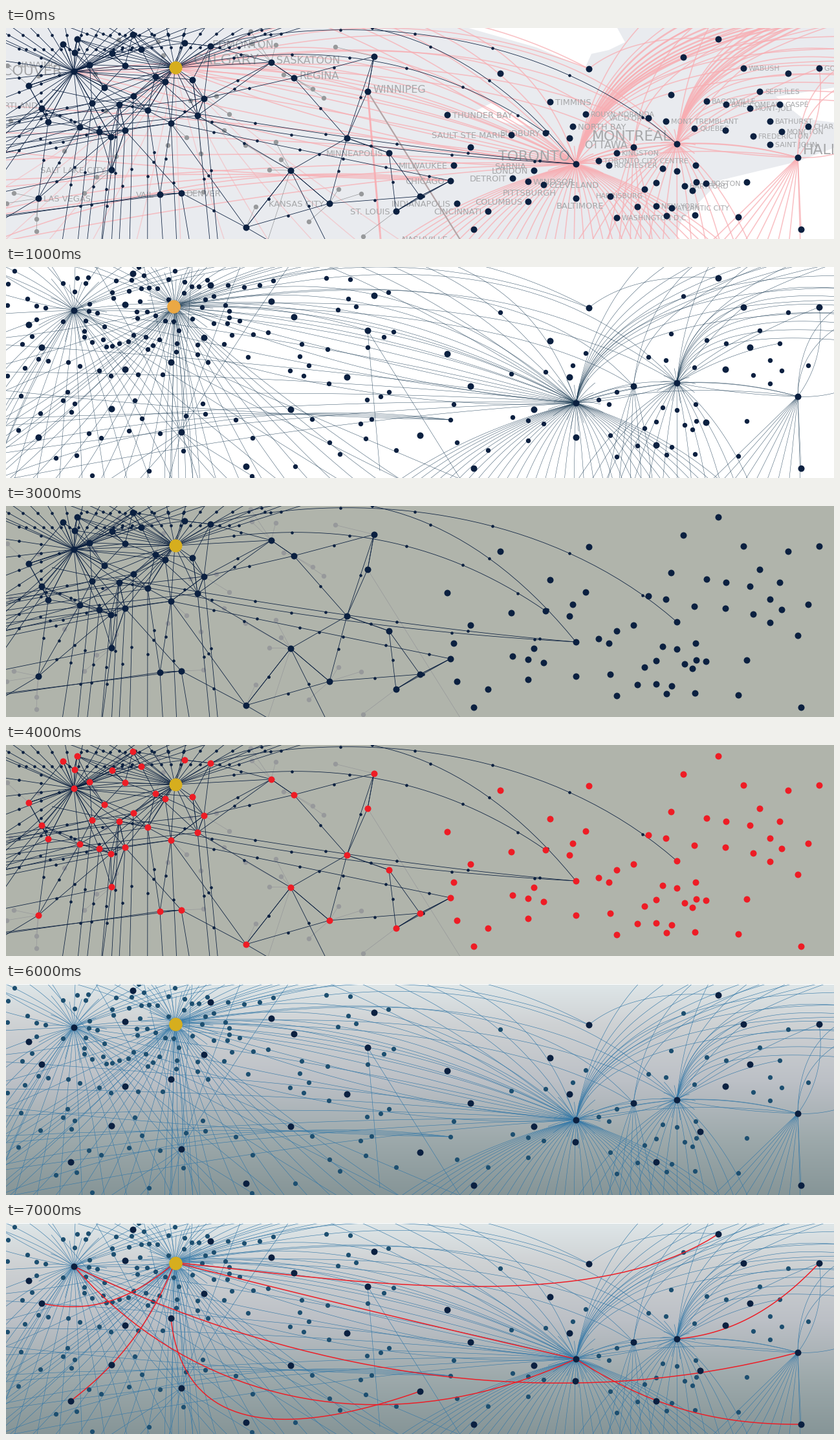
A matplotlib script for the animation above (9000 ms loop, 1280 by 326 pixels).

```python
import numpy as np
import matplotlib.pyplot as plt
from matplotlib.animation import FuncAnimation
from matplotlib.collections import LineCollection

W, H, DPI = 1280, 326, 100
PT = 72 / DPI
NAVY, RED, GOLD, ORANGE = "#0b2040", "#ee1c25", "#d6ae1e", "#eba844"
BLUE, STEEL, INK = "#3579a8", "#1d4f70", "#1c3c55"
GREY, PINK, LAND, STONE = "#97999b", "#f8adb2", "#e9ebef", "#b0b4ab"

# ---------- places ----------
# cities whose name stands left of the dot, then right of it
LEFT = {
    "TORONTO": (881, 210), "MONTRÉAL": (1037, 179), "OTTAWA": (970, 184),
    "SAULT STE MARIE": (781, 165), "SUDBURY": (834, 162), "LONDON": (816, 220),
    "DETROIT": (783, 232), "COLUMBUS": (807, 268), "CINCINNATI": (745, 283),
    "INDIANAPOLIS": (697, 271), "CHICAGO": (687, 236), "MILWAUKEE": (692, 212),
    "MINNEAPOLIS": (592, 193), "KANSAS CITY": (500, 271), "ST. LOUIS": (603, 283),
    "SALT LAKE CITY": (163, 219), "VAIL": (238, 257), "VAL-D'OR": (993, 139)}
RIGHT = {
    "WINNIPEG": (559, 98), "REGINA": (445, 77), "SASKATOON": (410, 53),
    "DENVER": (271, 255), "LAS VEGAS": (50, 263), "THUNDER BAY": (682, 134),
    "TIMMINS": (841, 114), "ROUYN-NORANDA": (896, 133), "NORTH BAY": (876, 152),
    "MONT TREMBLANT": (1020, 144), "KINGSTON": (944, 193),
    "TORONTO CITY CENTRE": (916, 205), "ROCHESTER": (932, 212), "WINDSOR": (807, 237),
    "CLEVELAND": (831, 242), "WASHINGTON D.C.": (944, 293), "NEW YORK": (1005, 275),
    "ATLANTIC CITY": (1029, 278), "HARTFORD": (1049, 244), "BOSTON": (1082, 240),
    "QUÉBEC": (1064, 155), "BAGOTVILLE": (1083, 113), "BAIE-COMEAU": (1113, 118),
    "SEPT-ÎLES": (1165, 98), "GASPÉ": (1196, 118), "MONT-JOLI": (1150, 124),
    "BATHURST": (1181, 144), "MONCTON": (1199, 160), "FREDERICTON": (1155, 167),
    "SAINT JOHN": (1181, 180), "CHARLOTTETOWN": (1240, 152), "HALIFAX": (1224, 200),
    "WABUSH": (1140, 62), "GOOSE BAY": (1257, 62)}
LARGE = {"TORONTO", "MONTRÉAL", "HALIFAX"}
MEDIUM = {"WINNIPEG", "REGINA", "SASKATOON", "OTTAWA"}
HUBS = LARGE | MEDIUM | {
    "SALT LAKE CITY", "DENVER", "LAS VEGAS", "LONDON", "THUNDER BAY", "TIMMINS",
    "NEW YORK", "BOSTON", "MONT-JOLI", "WABUSH", "GOOSE BAY"}
CITIES = LEFT | RIGHT

YVR, YYC = (105, 67), (261, 61)
YYZ, YUL, YOW, YHZ, DEN, YWG, ORD, LAS, BOS = (CITIES[k] for k in (
    "TORONTO", "MONTRÉAL", "OTTAWA", "HALIFAX", "DENVER", "WINNIPEG", "CHICAGO",
    "LAS VEGAS", "BOSTON"))
SOUTH, NORTH, EAST_END, CAPE = (881, 263), (901, 63), (1101, 17), (1229, 311)

unnamed = [YVR, (196, 10), (316, 28), (184, 58), (35, 89), (55, 124), (184, 158),
           (255, 147), (306, 109), (569, 44), (527, 170), (440, 220), (371, 308),
           (640, 260), (718, 184), (723, 311), (871, 170), (1112, 158),
           SOUTH, NORTH, EAST_END, CAPE]
hubs = unnamed + [CITIES[k] for k in CITIES if k in HUBS]
towns = [CITIES[k] for k in CITIES if k not in HUBS]


def scatter(n, box, gap, taken, lean=1.0, seed=1):
    """Seeded points in a box, kept apart from each other and from taken."""
    rng = np.random.default_rng(seed)
    x0, y0, x1, y1 = box
    have = list(taken)
    while len(have) < len(taken) + n:
        u, v = rng.random(2)
        p = (x0 + (x1 - x0) * u ** lean, y0 + (y1 - y0) * v)
        if np.hypot(*(np.array(have) - p).T).min() > gap:
            have.append(p)
    return have[len(taken):]


known = hubs + towns + [YYC]
coast_east = scatter(11, (905, 205, 1070, 295), 13, known, seed=4)
sparse = scatter(6, (740, 10, 1230, 300), 42, known + coast_east, seed=6)
inland = scatter(20, (60, 8, 325, 172), 17, known, seed=2)
east = coast_east + sparse
small = towns + east + inland
small += scatter(48, (120, 0, 350, 132), 9, known + small, seed=7)
small += scatter(72, (0, 0, 600, 326), 13, known + small, 1.35, seed=8)
minor = scatter(40, (0, 0, 560, 326), 16, known + inland, 1.2, seed=9)
atlas = hubs + towns + east + inland

# ---------- curve helpers ----------
T = np.linspace(0, 1, 40)[:, None]
span = np.linspace


def bow(a, c, b):
    a, c, b = map(np.array, (a, c, b))
    return (1 - T) ** 2 * a + 2 * T * (1 - T) * c + T ** 2 * b


def cubic(a, c, d, b):
    return (1 - T) * bow(a, c, d) + T * bow(c, d, b)


def arc(a, b, lift):
    """Curve from a to b, bent upwards by lift at its middle."""
    mid = (np.array(a) + np.array(b)) / 2
    return bow(a, mid - (0, 2 * lift), b)


def shower(hub, x0, x1, n, drop=0.35, pull=0.6):
    hx, hy = hub
    return [bow(hub, (hx + (x - hx) * pull, hy + (335 - hy) * drop), (x, 335))
            for x in span(x0, x1, n)]


def spray(hub, x0, x1, n, pull=0.35):
    hx, hy = hub
    return [bow(hub, (hx + (x - hx) * pull, hy * 0.4), (x, -8))
            for x in span(x0, x1, n)]


def rays(hub, n, reach):
    turn = span(0, 2 * np.pi, n, endpoint=False) + 0.05
    return [arc(hub, (hub[0] + r * np.cos(t), hub[1] + r * np.sin(t)), 2)
            for t, r in zip(turn, reach * (0.8 + 0.2 * np.sin(5 * turn)))]


# ---------- curved route network ----------
def west_routes():
    c = rays(YVR, 14, 60) + rays(YYC, 36, 70)
    c += shower(YYC, -150, 620, 22, 0.5, 0.42) + shower(YYC, 245, 300, 6, 0.5, 0.8)
    c += shower(YVR, -60, 260, 10, 0.5, 0.62) + shower(YVR, 330, 720, 5, 0.42, 0.4)
    c += shower(DEN, 150, 400, 6, 0.5, 0.5)
    c += spray(YYC, 80, 560, 15) + spray(YVR, -60, 400, 12)
    c += [bow(YVR, (50, 67 + (y - 67) * .35), (-8, y)) for y in span(10, 290, 10)]
    c += [bow(YYC, (140, 80 + (y - 80) * .45), (-8, y)) for y in span(110, 320, 6)]
    c += [arc(DEN, (x, -5), 6) for x in span(60, 440, 6)]
    return c


def east_routes():
    c = [arc((-8, y), ORD, k) for y, k in zip(span(190, 325, 4), span(-8, 44, 4))]
    # transcontinental
    c += [bow(YYZ, (590, y), YYC) for y in span(-45, 190, 8)]
    c += [bow(YYZ, (520, y), YVR) for y in span(10, 230, 5)]
    c += [bow(YYZ, (480, 150 + 0.4 * (y - 120)), (-8, y)) for y in span(120, 330, 6)]
    c += [bow(YYZ, (x + 150, 50), (x, -8)) for x in span(480, 680, 5)]
    c += [bow(YOW, (780, y), YYC) for y in (-30, 60)]
    c += [bow(YUL, (800, y), YYC) for y in (-80, -25, 30)]
    c += [arc(YYC, NORTH, k) for k in (62, 84)] + [bow(NORTH, (970, 8), EAST_END)]
    c += [arc(YWG, p, 14) for p in (YYZ, YYC, YVR)]
    c += [arc(YWG, p, 0) for p in ((578, 315), (704, 330))]
    # southbound
    c += shower(YYZ, 600, 1110, 34) + shower(YUL, 880, 1150, 13)
    c += shower(YOW, 930, 1000, 5) + shower(YHZ, 1085, 1228, 9, 0.5, 0.5)
    # overseas
    c += [bow(YYZ, (905, 75), (x, -8)) for x in span(985, 1290, 8)]
    c += [bow(YYZ, (925, y), (1290, y - 5)) for y in span(18, 75, 4)]
    c += [bow(YUL, (1048, 70), (x, -8)) for x in span(1090, 1290, 4)]
    c += [bow(YUL, (1065, y), (1290, y + 18)) for y in span(15, 95, 7)]
    c += [bow(YOW, (985, 60), (x, -8)) for x in (1070, 1190)]
    c += [bow(YHZ, (1225, y), (1290, y - 40)) for y in (100, 130)]
    # regional
    c += [arc(YYZ, YUL, k) for k in (-6, 4, 12)] + [arc(YYZ, YOW, 5)]
    c += [arc(YYZ, YHZ, k) for k in (14, 26)] + [arc(YUL, YHZ, k) for k in (-4, 8)]
    c += [arc(YUL, CITIES[k], 8) for k in ("WABUSH", "SEPT-ÎLES", "GOOSE BAY", "GASPÉ")]
    c += [bow(CITIES["GOOSE BAY"], (1268, 140), YHZ), arc(YHZ, CAPE, 0),
          arc(YHZ, (1290, 192), -3)]
    return c + rays(YYZ, 22, 45) + rays(YUL, 14, 34)


west, far = west_routes(), east_routes()

# ---------- straight-leg network ----------
trunks = [cubic((316, 28), (500, -20), (815, -15), YUL),
          cubic((316, 28), (480, -40), (690, -25), YYZ),
          cubic(YYC, (460, 20), (650, 35), CITIES["SUDBURY"]),
          cubic((71, 95), (340, 155), (600, 195), YYZ),
          cubic((169, 111), (400, 150), (640, 190), YYZ),
          arc((255, 147), ORD, 0)]
beads = [p for t in trunks for p in t[6:-2:6]]

nodes = np.array([p for p in atlas if p[0] < 700 and p not in
                  (CITIES["THUNDER BAY"], CITIES["MILWAUKEE"], CITIES["INDIANAPOLIS"])])
legs = []
for a in nodes:
    order = np.argsort(np.hypot(*(nodes - a).T))
    legs += [(a, nodes[order[k]]) for k in ((1, 2) if a[0] > 550 else (1, 3, 6))]
    if 100 < a[0] < 460 and a[1] > 100:
        legs.append((a, (a[0] + 0.25 * (a[0] - 220), 330)))
legs += [(p, (-8, p[1] + 35)) for p in nodes if p[0] < 330 and p[1] > 100]
beads += [(np.array(a) + b) / 2 for a, b in legs if np.hypot(*(np.array(a) - b)) > 90]

spokes = [(YVR, (x, -8)) for x in span(-60, 330, 14)]
spokes += [(YVR, (-8, y)) for y in span(20, 230, 8)]
spokes += [(YYC, (x, -8)) for x in span(80, 480, 13)]
beads += [np.array(a) + (np.array(b) - a) * f for a, b in spokes for f in (0.45, 0.75)]
spokes += [(hub, p) for hub in (YVR, YYC) for p in nodes
           if 30 < np.hypot(*(p - hub)) < 160]

twigs = [(m, nodes[np.argmin(np.hypot(*(nodes - m).T))]) for m in minor]
twigs += [(YWG, (704, 330)), ((440, 220), (404, 330))]

# ---------- drawing ----------
fig = plt.figure(figsize=(W / DPI, H / DPI), dpi=DPI)


def stage(color="white"):
    ax = fig.add_axes([0, 0, 1, 1], facecolor=color)
    ax.set(xlim=(0, W), ylim=(H, 0), xticks=[], yticks=[])
    for s in ax.spines.values():
        s.set_visible(False)
    return ax


def lines(ax, paths, color, width, z=2, alpha=1):
    ax.add_collection(LineCollection(paths, colors=color, linewidths=width * PT,
                                     alpha=alpha, zorder=z))


def dots(ax, pts, r, color, z=5):
    x, y = np.array(pts).T
    ax.scatter(x, y, s=(2 * r * PT) ** 2, c=color, linewidths=0, zorder=z)


def sky(ax):
    ys = [0, 60, 150, 240, 326]
    tones = np.array([(222, 230, 232), (207, 210, 212), (188, 192, 198),
                      (157, 169, 171), (134, 149, 151)]) / 255
    grad = np.stack([np.interp(np.arange(H), ys, c) for c in tones.T], 1)[:, None]
    ax.imshow(grad, extent=(0, W, H, 0), aspect="auto", zorder=0)
    ax.set(xlim=(0, W), ylim=(H, 0))


def edge(ax, y, color):
    lines(ax, [[(0, y), (W, y)]], color, 1, 9)


def label(ax, x, y, name, ha="left"):
    size = (22 if name in LARGE | {"CALGARY", "VANCOUVER"} else
            16 if name in MEDIUM | {"EDMONTON"} else 13 if x < 900 else 11)
    ax.text(x, y - 1.4 * max(size - 13, 0), name, size=size * PT, color="#a6a7a9",
            ha=ha, va="center_baseline", family="DejaVu Sans", zorder=3, clip_on=True)


def base_map(ax):
    bay = [(715, 0), (945, 0), (957, 22), (932, 34), (905, 40), (895, 62), (820, 30)]
    ocean = [(1280, 185), (1225, 206), (1105, 235), (1045, 296), (1035, 326), (1280, 326)]
    gulf = [(1190, 106), (1280, 92), (1280, 146), (1232, 140)]
    lake = [(722, 130), (750, 116), (800, 138), (812, 152), (770, 146)]
    for shape in (bay, ocean, gulf, lake):
        ax.fill(*zip(*shape), color="white", lw=0, zorder=1)
    lines(ax, far, PINK, 1.6, 2, 0.75)
    lines(ax, shower(YYC, -150, 620, 12, 0.5, 0.42), PINK, 1.4, 2, 0.5)
    bundle = [bow(YYZ, (915 + k, 62 - k), (1050 + 9 * k, -8)) for k in range(0, 24, 3)]
    bundle += [bow(YUL, (1050, 60 + k), (1180 + 4 * k, -8)) for k in range(0, 20, 4)]
    lines(ax, bundle, PINK, 2.6, 2, 0.8)
    lines(ax, [(YWG, (579, 326))], PINK, 3, 2, 0.8)
    lines(ax, [(YWG, (704, 330))], "#c9b3b4", 2.4, 2)
    for name, (x, y) in LEFT.items():
        label(ax, x - 9, y, name, "right")
    for name, (x, y) in RIGHT.items():
        label(ax, x + 8, y, name)
    for name, x, y in [("CALGARY", 290, 61), ("EDMONTON", 318, 29), ("VANCOUVER", -50, 78),
                       ("NANAIMO", 18, 56), ("PORTLAND", -20, 119), ("SARNIA", 755, 213),
                       ("PITTSBURGH", 768, 254), ("BALTIMORE", 851, 274),
                       ("HARRISBURG", 912, 259), ("NASHVILLE", 612, 326)]:
        label(ax, x, y, name)


def legs_map(ax, dot):
    lines(ax, twigs, GREY, 0.7, 4)
    lines(ax, trunks + legs + spokes, NAVY, 0.8, 5)
    dots(ax, minor, 3.7, GREY, 4.5)
    dots(ax, beads, 2.3, NAVY, 6)
    dots(ax, atlas, 5, dot, 7)
    dots(ax, [(262, 61)], 10, GOLD, 8)


def scene_map():
    ax = stage(LAND)
    base_map(ax)
    legs_map(ax, NAVY)
    return ax


def scene_white(color):
    ax = stage()
    lines(ax, west + far, INK, 0.5, 2, 0.9)
    dots(ax, small, 3.7, NAVY)
    dots(ax, hubs, 5, color, 6)
    dots(ax, [(259, 61)], 10.3, ORANGE, 7)
    return ax


def scene_stone(dot):
    ax = stage(STONE)
    legs_map(ax, dot)
    edge(ax, 325.5, "#a9a3a4")
    return ax


def scene_specks():
    ax = stage()
    sky(ax)
    lines(ax, west + far, BLUE, 0.6)
    dots(ax, np.array(small) + (-1, 1), 3.9, STEEL)
    dots(ax, np.array(hubs) + (-1, 1), 2.6, RED, 6)
    dots(ax, [YYC], 2.8, GOLD, 7)
    edge(ax, 325.5, "#85809a")
    return ax


SHIFT = {LAS: (100, 275), SOUTH: (880, 244), BOS: (1073, 228)}
routes = [cubic(YYC, (500, 85), (900, 150), EAST_END),
          arc(YYC, YYZ, -2),
          cubic(YVR, (300, 290), (600, 340), YYZ),
          cubic(YVR, (450, 235), (850, 300), YHZ),
          cubic((255, 148), (275, 330), (440, 330), (640, 260)),
          cubic((55, 124), (150, 145), (215, 100), YYC),
          cubic(YYC, (220, 165), (165, 225), SHIFT[LAS]),
          cubic(YYZ, (990, 280), (1090, 312), CAPE),
          cubic(YUL, (1150, 170), (1220, 100), CITIES["GOOSE BAY"])]


def scene_blue(flown):
    ax = stage()
    sky(ax)
    lines(ax, west + far, BLUE, 0.6)
    dots(ax, small, 3.6, STEEL)
    lines(ax, flown, RED, 1.5, 6)
    dots(ax, [SHIFT.get(p, p) for p in hubs], 5, NAVY, 7)
    dots(ax, [(262, 62)], 10.3, GOLD, 8)
    edge(ax, 0.2, "white")
    edge(ax, 325.5, "white")
    return ax


scenes = [scene_map(), scene_white(NAVY), scene_white(RED), scene_stone(NAVY),
          scene_stone(RED), scene_specks(), scene_blue([]), scene_blue(routes)]


def show(i):
    now = min(i, len(scenes) - 1)
    for k, ax in enumerate(scenes):
        ax.set_visible(k == now)
    return []


anim = FuncAnimation(fig, show, frames=9, init_func=lambda: show(0), interval=1000,
                     repeat=True, repeat_delay=0, blit=False)
plt.show()
```
